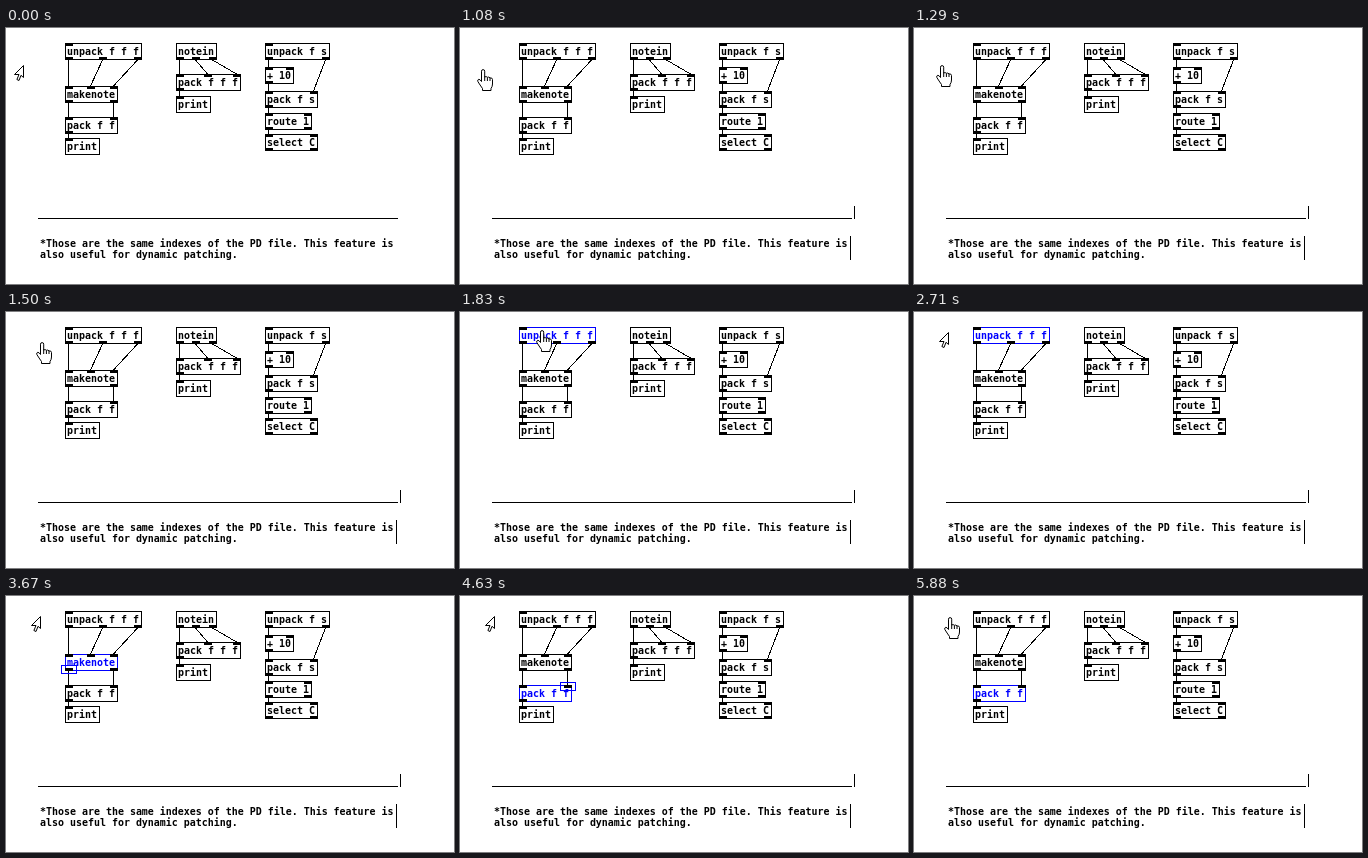
Recreate the animation shown at these times as an HTML page. Size 448 px wide and 256 px high, loop 8000 ms.

```html
<!DOCTYPE html>
<html lang="en">
<head>
<meta charset="utf-8">
<title>Patch navigation</title>
<style>
  html, body { margin: 0; width: 100%; height: 100%; overflow: hidden; background: #fff; }
  svg { display: block; width: 448px; height: 256px; }
  text { font: bold 9.966px "DejaVu Sans Mono", monospace; white-space: pre; }
  #patch, #marks { shape-rendering: crispEdges; }
  .box, .cord, .mark { fill: none; stroke: #000; }
  .on .box, .cord.on, .mark { stroke: #00f; }
  .on text { fill: #00f; }
  .cursor { fill: #fff; stroke: #000; stroke-linejoin: round; }
</style>
</head>
<body>
<svg viewBox="0 0 448 256">
  <g id="patch">
    <path class="cord" d="M32 190.5H392"/>
    <path class="cord" id="edit" d="M394.5 178V191M390.5 208V232"/>
  </g>
  <text x="34" y="219">*Those are the same indexes of the PD file. This feature is</text>
  <text x="34" y="230">also useful for dynamic patching.</text>
  <g id="marks"><rect class="mark" id="mark"/></g>
  <g class="cursor" id="arrow">
    <path d="M9.5 .5V12.5L7 10.3L5 15.5L2.9 14.5L5 9.5H.5Z"/>
  </g>
  <g class="cursor" id="hand">
    <path d="M4.5 12.5V2.2a1.6 1.6 0 0 1 3.2 0V8q1.5-1 2.7.3q1.5-.8 2.6.6q2.3-.4 2.5 1.6V15q0 2.5-1.5 4.5v2H5.5v-2Q3 16 .9 12.6Q.2 10.6 1.8 10.3Q3 10.2 4.5 12.5Z"/>
    <path d="M7.7 7.5V12M10.4 8.5V12M13 9V12" fill="none"/>
  </g>
</svg>
<script>
const LOOP = 8000;
const $ = id => document.getElementById(id);
const patch = $("patch");

function add(parent, tag, attrs) {
  const el = document.createElementNS("http://www.w3.org/2000/svg", tag);
  for (const k in attrs) el.setAttribute(k, attrs[k]);
  parent.appendChild(el);
  return el;
}

// Left edge of the i-th of n inlets or outlets
const portX = (o, n, i) => o.x + (n > 1 ? Math.floor((o.w - 7) * i / (n - 1)) : 0);

function object(label, x, y, ins, outs) {
  const o = { x, y, ins, outs, w: label.length * 6 + 4, h: 16 };
  o.g = add(patch, "g", {});
  add(o.g, "rect", { class: "box", x: x + .5, y: y + .5, width: o.w, height: o.h });
  for (let i = 0; i < ins; i++) add(o.g, "rect", { x: portX(o, ins, i), y, width: 8, height: 3 });
  for (let i = 0; i < outs; i++) add(o.g, "rect", { x: portX(o, outs, i), y: y + 14, width: 8, height: 3 });
  add(o.g, "text", { x: x + 2, y: y + 12 }).textContent = label;
  return o;
}

function cord(a, out, b, inlet) {
  const x1 = portX(a, a.outs, out) + 3.5, x2 = portX(b, b.ins, inlet) + 3.5;
  return add(patch, "path", { class: "cord", d: `M${x1} ${a.y + 17}L${x2} ${b.y}` });
}

const unpack = object("unpack f f f", 59, 15, 1, 3);
const makenote = object("makenote", 59, 58, 3, 2);
const pack = object("pack f f", 59, 89, 2, 1);
const print1 = object("print", 59, 110, 1, 0);
const cordA = cord(unpack, 0, makenote, 0);
cord(unpack, 1, makenote, 1);
cord(unpack, 2, makenote, 2);
const cordB = cord(makenote, 0, pack, 0);
cord(makenote, 1, pack, 1);
cord(pack, 0, print1, 0);

const notein = object("notein", 170, 15, 0, 3);
const pack3 = object("pack f f f", 170, 46, 3, 1);
const print2 = object("print", 170, 68, 1, 0);
for (let i = 0; i < 3; i++) cord(notein, i, pack3, i);
cord(pack3, 0, print2, 0);

const unpackS = object("unpack f s", 259, 15, 1, 2);
const plus = object("+ 10", 259, 39, 2, 1);
const packS = object("pack f s", 259, 63, 2, 1);
const route = object("route 1", 259, 85, 2, 2);
const select = object("select C", 259, 106, 2, 2);
cord(unpackS, 0, plus, 0);
cord(unpackS, 1, packS, 1);
cord(plus, 0, packS, 0);
cord(packS, 0, route, 0);
cord(route, 0, select, 0);

// Keyboard navigation: time, selected object, marked port, selected cord
const inlet = (o, i) => [portX(o, o.ins, i), o.y];
const outlet = (o, i) => [portX(o, o.outs, i), o.y + 14];
const states = [
  [0],
  [1830, unpack],
  [2880, unpack, outlet(unpack, 0)],
  [3130, unpack, outlet(unpack, 0), cordA],
  [3380, makenote, inlet(makenote, 0)],
  [3670, makenote, outlet(makenote, 0)],
  [4000, makenote, outlet(makenote, 0), cordB],
  [4290, pack, inlet(pack, 0)],
  [4630, pack, inlet(pack, 1)],
  [5880, pack]
];

// Pointer path: time, x, y (top left of the arrow)
const track = [
  [0, 8, 37], [570, 8, 37], [750, 12, 40], [1080, 12, 40],
  [1290, 17, 36], [1500, 25, 29], [1584, 42, 22], [1710, 71, 17],
  [1830, 71, 17], [1938, 55, 24], [2046, 32, 27], [2124, 20, 26],
  [2208, 25, 20], [LOOP, 25, 20]
];

// The pointer is redrawn in small steps, not continuously
function stepped(t) {
  const [from, step] = t < 1000 ? [570, 60] : t < 1830 ? [1080, 42] : [1830, 54];
  return t < from || t >= 2208 ? t : from + Math.floor((t - from) / step) * step;
}

function pointer(t) {
  const i = Math.max(1, track.findIndex(p => p[0] > t));
  const [t0, x0, y0] = track[i - 1], [t1, x1, y1] = track[i];
  const u = (t - t0) / (t1 - t0);
  return [Math.round(x0 + (x1 - x0) * u), Math.round(y0 + (y1 - y0) * u)];
}

const show = (el, on) => el.setAttribute("visibility", on ? "visible" : "hidden");

function render(t) {
  const [, chosen, port, wire] = states.filter(s => s[0] <= t).pop();
  for (const o of [unpack, makenote, pack]) o.g.classList.toggle("on", o === chosen);
  for (const c of [cordA, cordB]) c.classList.toggle("on", c === wire);

  const mark = $("mark");
  show(mark, port);
  if (port) {
    const box = { x: port[0] - 3.5, y: port[1] - 2.5, width: 15, height: 8, "stroke-width": wire ? 3 : 1 };
    for (const k in box) mark.setAttribute(k, box[k]);
  }

  const [x, y] = pointer(stepped(t));
  const isHand = t >= 1000 && t < 2710 || t >= 5460;
  show($("edit"), t >= 1000);
  show($("hand"), isHand);
  show($("arrow"), !isHand);
  $("arrow").setAttribute("transform", `translate(${x} ${y})`);
  $("hand").setAttribute("transform", `translate(${x + 5} ${y + 1})`);
}

const start = performance.now();
function tick() {
  render((performance.now() - start) % LOOP);
  requestAnimationFrame(tick);
}
tick();
</script>
</body>
</html>
```
